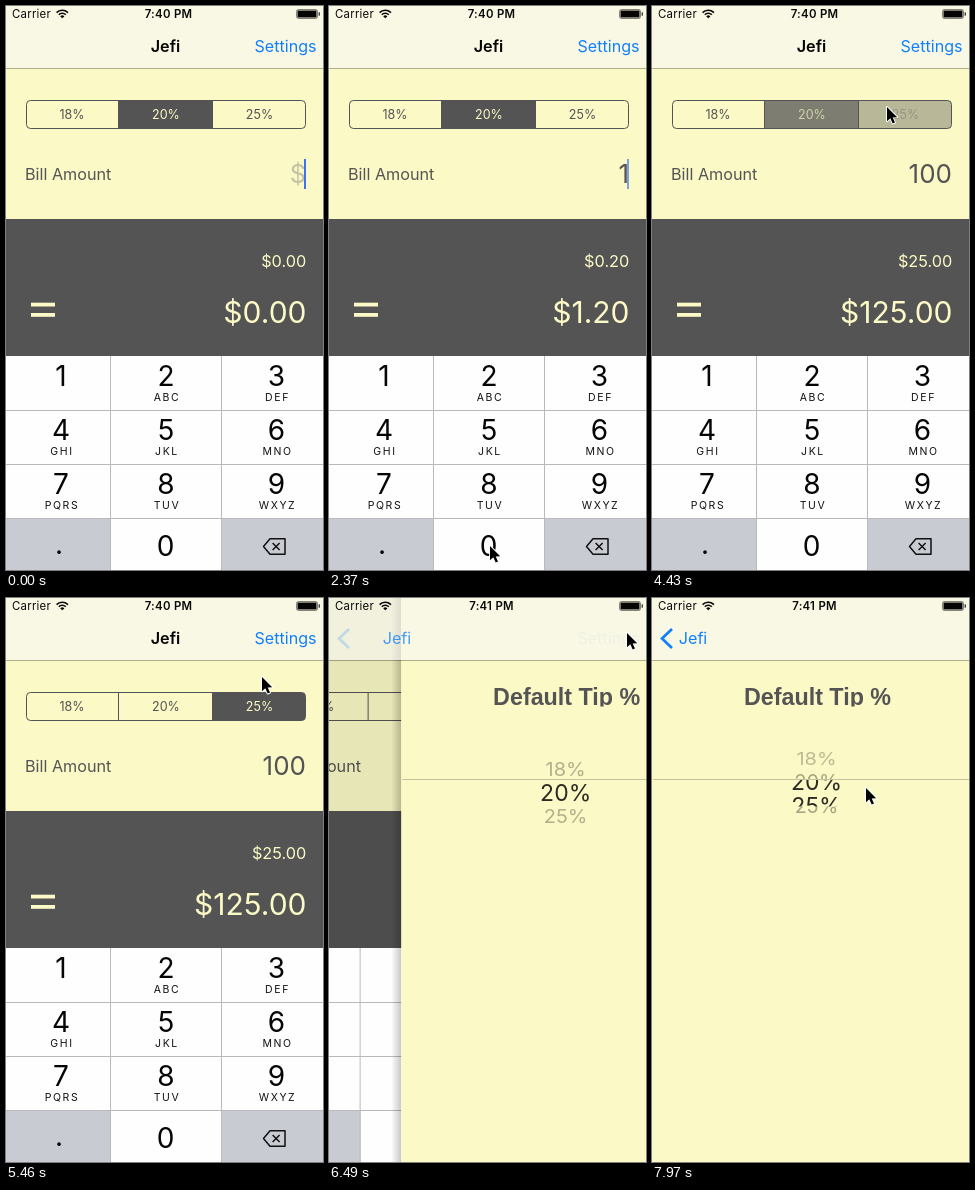
These frames come from a looping animation (317x564 px, 8000 ms). An HTML page with a canvas:

```html
<!DOCTYPE html>
<html lang="en">
<head>
<meta charset="utf-8">
<title>Tip calculator</title>
<style>
html, body { margin: 0; width: 100%; height: 100%; overflow: hidden; background: #fbf9c6; }
canvas { display: block; width: 317px; height: 564px; }
</style>
</head>
<body>
<canvas id="stage"></canvas>
<script>
const W = 317, H = 564, LOOP = 8000;
const FIRST = 291, TICK = 147.55;   // the screen refreshes in steps
const YELLOW = '#fbf9c6', DARK = '#545454', BLUE = '#1080fb', GREY_KEY = '#c9cbd3';
const SANS = 'Inter, Roboto, sans-serif';
const APP = 'Jefi';
const TIPS = ['18%', '20%', '25%'];

const canvas = document.getElementById('stage');
const ctx = canvas.getContext('2d');
const dpr = window.devicePixelRatio || 1;
canvas.width = Math.round(W * dpr);
canvas.height = Math.round(H * dpr);

// Pointer path: tick, x, y
const POINTER = [
  [8, 110, 430], [9, 53, 373], [11, 53, 373], [13, 161, 540], [20, 161, 540],
  [21, 228, 417], [23, 235, 101], [34, 235, 101], [37, 298, 35], [43, 298, 35],
  [47, 216, 227], [48, 214, 221], [49, 214, 213], [50, 214, 213], [51, 214, 202], [52, 214, 190]
];
// Text caret: tick, opacity
const CARET = [
  [-1, 1], [0, .45], [1, 0], [3, .5], [4, 1], [6, .45], [7, 0], [9, .5], [10, 1],
  [14, .65], [15, 1], [21, .2], [22, 0], [24, .5], [25, 1], [27, .4], [28, 0],
  [31, 1], [34, .45], [35, 0], [37, .5], [38, 1], [40, .4], [41, 0]
];
const BILL = [[-1, 0], [11, 1], [16, 10], [18, 100]];

const lerp = (a, b, k) => a + (b - a) * k;

function held(keys, n) {
  let value = keys[0][1];
  for (const [at, v] of keys) if (n >= at) value = v;
  return value;
}

function pointerAt(n) {
  if (n < POINTER[0][0]) return null;
  let i = 0;
  while (i < POINTER.length - 2 && n >= POINTER[i + 1][0]) i++;
  const [ta, xa, ya] = POINTER[i], [tb, xb, yb] = POINTER[i + 1];
  const k = Math.min(1, (n - ta) / (tb - ta));
  return [lerp(xa, xb, k), lerp(ya, yb, k)];
}

function rect(x, y, w, h, color) {
  ctx.fillStyle = color;
  ctx.fillRect(x, y, w, h);
}

function text(str, x, y, size, color, opt = {}) {
  ctx.font = `${opt.weight || 400} ${size}px ${opt.family || SANS}`;
  ctx.textAlign = opt.align || 'left';
  ctx.letterSpacing = (opt.space || 0) + 'px';
  ctx.fillStyle = color;
  ctx.fillText(str, x, y);
}

function faded(alpha, draw) {
  if (alpha <= 0) return;
  ctx.save();
  ctx.globalAlpha *= Math.min(1, alpha);
  draw();
  ctx.restore();
}

function poly(points, closed) {
  ctx.beginPath();
  points.forEach(([x, y]) => ctx.lineTo(x, y));
  if (closed) ctx.closePath();
}

function stroke(color, width) {
  ctx.strokeStyle = color;
  ctx.lineWidth = width;
  ctx.stroke();
}

function mix(k) {
  const a = [84, 84, 84], b = [251, 249, 198];
  return `rgb(${a.map((v, i) => Math.round(lerp(v, b[i], k)))})`;
}

function segments(n) {
  let fill = [0, 1, 0];
  if (n === 27) fill = [0, 1, .2];
  if (n === 28) fill = [0, .75, .4];
  if (n > 28) fill = [0, 0, 1];
  const edges = [20, 112.5, 206.5, 300];
  ctx.save();
  ctx.beginPath();
  ctx.roundRect(20.5, 94.5, 279, 28, 4);
  ctx.clip();
  fill.forEach((f, i) => faded(f, () => rect(edges[i], 94, edges[i + 1] - edges[i], 29, DARK)));
  ctx.restore();
  ctx.beginPath();
  ctx.roundRect(20.5, 94.5, 279, 28, 4);
  for (const x of [112.5, 206.5]) {
    ctx.moveTo(x, 94.5);
    ctx.lineTo(x, 122.5);
  }
  stroke(DARK, 1);
  TIPS.forEach((s, i) => text(s, [66, 160, 253.5][i], 113, 12.5, mix(fill[i]), { align: 'center' }));
}

function calculator(n) {
  const bill = held(BILL, n);
  const tip = bill * (n >= 28 ? .25 : .2);
  const money = v => '$' + v.toFixed(2);
  const right = { align: 'right' };
  rect(0, 0, W, 213, YELLOW);
  rect(0, 213, W, H - 213, DARK);
  segments(n);
  text('Bill Amount', 19, 173.5, 16.2, DARK);
  text(bill || '$', 300, 177, bill ? 26 : 25.5, bill ? DARK : '#c3c2a5', right);
  faded(held(CARET, n), () => rect(298, 153, 2, 30, '#4270ee'));
  text(money(tip), 300.3, 260.5, 16.3, YELLOW, right);
  text(money(bill + tip), 300.5, 317, 30, YELLOW, right);
  rect(25, 296.7, 24, 3.8, YELLOW);
  rect(25, 307, 24, 3.8, YELLOW);
}

function backspace() {
  poly([[257.5, 540.5], [264, 532.8], [279, 532.8], [279, 548.2], [264, 548.2]], true);
  ctx.lineJoin = 'round';
  stroke('#111', 1.5);
  ctx.beginPath();
  ctx.moveTo(266.6, 537); ctx.lineTo(273.6, 544);
  ctx.moveTo(273.6, 537); ctx.lineTo(266.6, 544);
  stroke('#111', 1.5);
}

function keyboard(n) {
  const letters = ['', 'ABC', 'DEF', 'GHI', 'JKL', 'MNO', 'PQRS', 'TUV', 'WXYZ'];
  const cols = [55, 160, 270.5];
  const mid = { align: 'center' };
  rect(0, 350, W, 214, '#fefefe');
  rect(0, 513, 105, 51, GREY_KEY);
  rect(215, 513, 102, 51, GREY_KEY);
  if (n === 15 || n === 17) rect(105, 513, 110, 51, GREY_KEY);
  for (const y of [404, 458, 512]) rect(0, y, W, 1, '#b9b9bb');
  for (const x of [104, 215]) rect(x, 350, 1, 214, '#b9b9bb');
  letters.forEach((s, i) => {
    const x = cols[i % 3], y = 380 + 54 * Math.floor(i / 3);
    text(i + 1, x, y, 28, '#050505', mid);
    text(s, x + 1, y + 15, 10.5, '#111', { align: 'center', space: 1.6 });
  });
  text('.', 53, 547.5, 28, '#050505', mid);
  text('0', 159.5, 549.5, 28, '#050505', mid);
  backspace();
}

function picker(shift) {
  const top = 182, bottom = 208.5, center = 195;
  const rows = (size, color, flat) => TIPS.forEach((s, i) => {
    const d = (i - 1) * 23.5 + shift;
    ctx.save();
    ctx.translate(164.5, center + d);
    if (!flat) ctx.scale(1, Math.cos(d / 70));
    text(s, 0, size * .364, size, color(Math.abs(d)), { align: 'center' });
    ctx.restore();
  });
  ctx.save();
  ctx.beginPath();
  ctx.rect(0, 140, W, top - 140);
  ctx.rect(0, bottom, W, 40);
  ctx.clip();
  rows(20, d => `rgba(60,60,45,${.5 - d / 200})`, false);
  ctx.restore();
  ctx.save();
  ctx.beginPath();
  ctx.rect(0, top, W, bottom - top);
  ctx.clip();
  rows(23, () => '#2b2b24', true);
  ctx.restore();
  rect(1, 181, W - 1, 1, '#c5c39e');
}

function settings(n) {
  rect(0, 0, W, H, YELLOW);
  ctx.save();
  ctx.beginPath();
  ctx.rect(0, 80, W, 28.5);
  ctx.clip();
  text('Default Tip %', 165.5, 106.5, 23.3, DARK,
    { weight: 700, align: 'center', family: '"Liberation Sans", Arial, sans-serif' });
  ctx.restore();
  picker(n >= 52 ? -11 : n === 51 ? -2 : 0);
}

function edgeShadow(x, p) {
  const g = ctx.createLinearGradient(x - 10, 0, x, 0);
  g.addColorStop(0, 'rgba(0,0,0,0)');
  g.addColorStop(1, `rgba(0,0,0,${.08 + .17 * p})`);
  rect(x - 10, 0, 10, H, g);
}

function statusBar(n) {
  text('Carrier', 6, 12.3, 11.4, '#0a0a0a', { space: .25 });
  for (const r of [4.8, 7.8]) {
    ctx.beginPath();
    ctx.arc(56.3, 12, r, -Math.PI * .76, -Math.PI * .24);
    stroke('#0a0a0a', 1.6);
  }
  ctx.beginPath();
  ctx.moveTo(56.3, 12.3);
  ctx.arc(56.3, 12.3, 2.8, -Math.PI * .76, -Math.PI * .24);
  ctx.fillStyle = '#0a0a0a';
  ctx.fill();
  text(n >= 36 ? '7:41 PM' : '7:40 PM', 162.5, 12.3, 11.4, '#0a0a0a',
    { weight: 600, align: 'center', space: .3 });
  ctx.beginPath();
  ctx.roundRect(290.5, 3.5, 21, 9, 2);
  stroke('rgba(0,0,0,.6)', .8);
  rect(291.5, 4.5, 19, 7, '#050505');
  rect(312.6, 6.3, 1.3, 3.4, '#333');
}

function navBar(n, p) {
  rect(0, 0, W, 62, 'rgba(248,248,248,.6)');
  rect(0, 62, W, 1, 'rgba(0,0,0,.3)');
  const x = lerp(159.5, 41, p);
  faded(1 - 2 * p, () => text(APP, x, 46, 16.2, '#050505', { weight: 600, align: 'center' }));
  faded(p, () => text(APP, x, 46, 16.2, BLUE, { align: 'center' }));
  faded(p ** 6, () => {
    poly([[20, 31], [10, 40.5], [20, 50]]);
    ctx.lineJoin = 'miter';
    stroke(BLUE, 2.7);
  });
  faded((n >= 40 ? .22 : 1) * (1 - p), () => text('Settings', 248.5, 46, 16.1, BLUE));
}

function pointer(n) {
  const at = pointerAt(n);
  if (!at) return;
  ctx.save();
  ctx.translate(at[0], at[1]);
  poly([[0, 0], [0, 14.3], [3.3, 11.3], [5.7, 16.6], [8, 15.6], [5.7, 10.4], [10.2, 10.2]], true);
  ctx.lineJoin = 'round';
  stroke('#fff', 1.8);
  ctx.fillStyle = '#000';
  ctx.fill();
  ctx.restore();
}

function pushed(n) {
  if (n < 41) return 0;
  return n > 45 ? 1 : 1 - Math.exp(-1.48 * (n - 41));
}

function draw(t) {
  const n = Math.max(-1, Math.floor((t - FIRST) / TICK));
  const p = pushed(n);
  const x = W * (1 - p);
  ctx.setTransform(dpr, 0, 0, dpr, 0, 0);
  if (p < 1) {
    ctx.save();
    ctx.translate(-95 * p, 0);
    calculator(n);
    ctx.restore();
    rect(0, 0, W, H, `rgba(0,0,0,${.1 * p})`);
    ctx.save();
    ctx.translate(-95 * p, 0);
    keyboard(n);
    ctx.restore();
  }
  if (n >= 41) {
    edgeShadow(x, p);
    ctx.save();
    ctx.translate(x, 0);
    settings(n);
    ctx.restore();
  }
  navBar(n, p);
  statusBar(n);
  pointer(n);
}

const start = performance.now();
function loop() {
  draw((performance.now() - start) % LOOP);
  requestAnimationFrame(loop);
}
loop();
</script>
</body>
</html>
```
